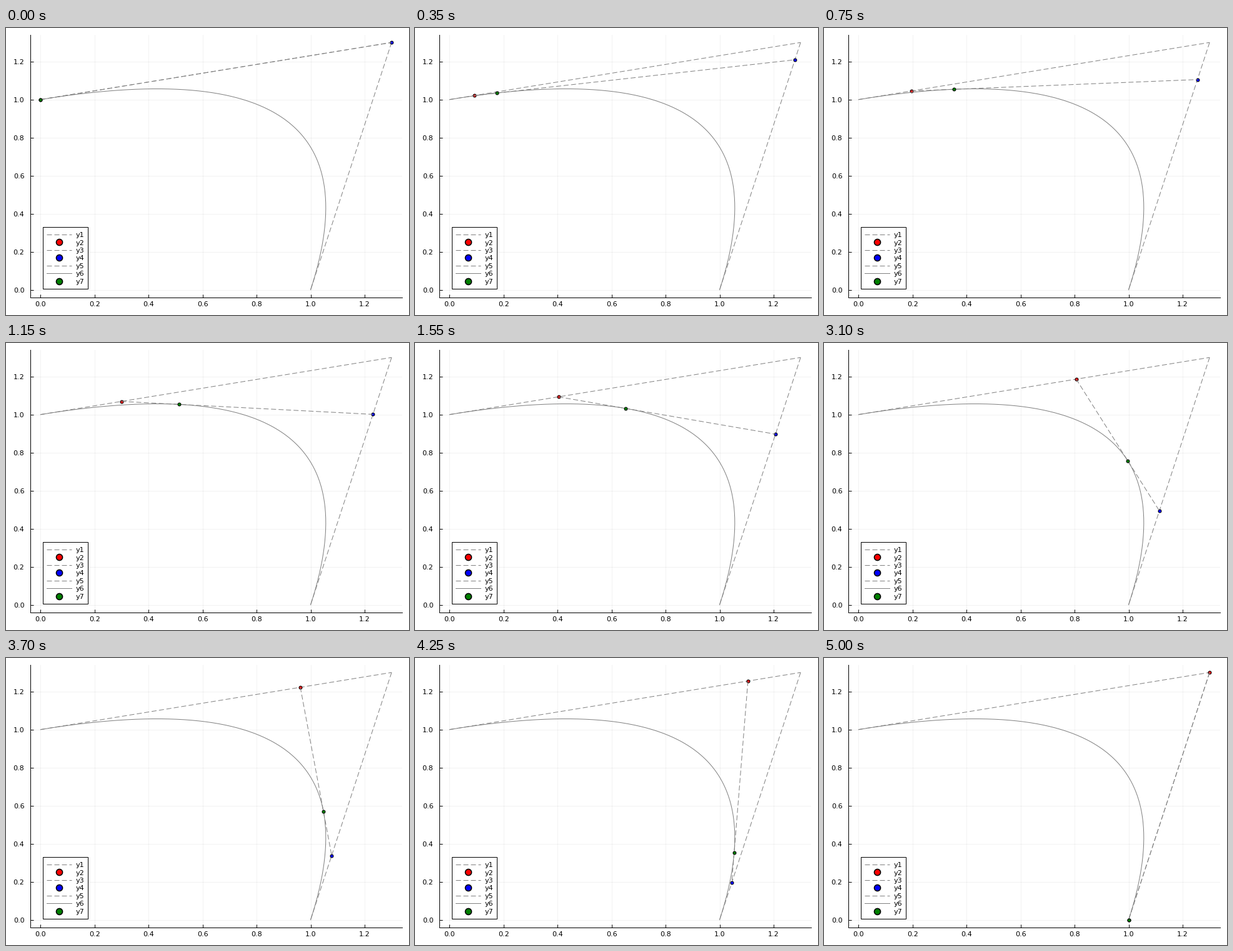
Recreate the animation shown at these times as a matplotlib script. Size 645 px wide and 460 px high, loop 5.05 s.

```python
import numpy as np
import matplotlib.pyplot as plt
from matplotlib.animation import FuncAnimation
from matplotlib.patches import Rectangle

W, H, DPI = 645, 460, 80
PX = 72 / DPI  # one pixel in points
STEPS = 100
LEFT, RIGHT, TOP, BOTTOM = 38.5, 634, 11.3, 431.5

plt.rcParams.update({"font.family": "DejaVu Sans", "font.size": 10})

A, B, C = np.array([[0, 1], [1.3, 1.3], [1, 0]])
SOLID = dict(color="gray", lw=PX)
DASHED = dict(SOLID, ls=(0, (8, 4)), dash_capstyle="butt")


def lerp(p, q, t):
    return p + (q - p) * t


def bezier(t):
    return lerp(lerp(A, B, t), lerp(B, C, t), t)


def dot(ax, x, y, color, size, edge):
    return ax.plot([x], [y], "o", ms=size * PX, mfc=color, mec="black",
                   mew=edge * PX, clip_on=False)[0]


def segment(ax, p, q, z):
    return ax.plot([p[0], q[0]], [p[1], q[1]], zorder=z, **DASHED)[0]


fig = plt.figure(figsize=(W / DPI, H / DPI), dpi=DPI, facecolor="white")

# Plot area
ax = fig.add_axes([LEFT / W, 1 - BOTTOM / H, (RIGHT - LEFT) / W, (BOTTOM - TOP) / H])
ax.set(xlim=(-0.039, 1.339), ylim=(-0.039, 1.339))
ticks = np.arange(7) * 0.2
labels = [f"{v:.1f}" for v in ticks]
ax.set_xticks(ticks, labels)
ax.set_yticks(ticks, labels)
ax.tick_params(direction="in", length=5 * PX, width=PX)
ax.tick_params(axis="x", pad=6.5 * PX)
ax.tick_params(axis="y", pad=9 * PX)
ax.grid(color="black", alpha=0.1, lw=0.5 * PX)
ax.set_axisbelow(True)
ax.spines[["top", "right"]].set_visible(False)
ax.spines[["left", "bottom"]].set_linewidth(PX)

# Construction lines, curve and moving points
segment(ax, A, B, 3)
red = dot(ax, *A, "red", 5, 1)
red.set_zorder(4)
segment(ax, B, C, 5)
blue = dot(ax, *B, "blue", 5, 1)
blue.set_zorder(6)
tangent = segment(ax, A, B, 7)
curve = np.array([bezier(t) for t in np.linspace(0, 1, 201)])
ax.plot(*curve.T, zorder=8, **SOLID)
green = dot(ax, *A, "green", 5, 1)
green.set_zorder(9)

# Legend, laid out in pixels
key = fig.add_axes([0, 0, 1, 1])
key.set(xlim=(-0.5, W - 0.5), ylim=(H - 0.5, -0.5))
key.axis("off")
key.add_patch(Rectangle((58, 318), 72.5, 99.5, fc="white", ec="black", lw=PX))
styles = [DASHED, "red", DASHED, "blue", DASHED, SOLID, "green"]
for i, style in enumerate(styles):
    y = 330.5 + 12.43 * i
    if isinstance(style, str):
        dot(key, 84.5, y, style, 10, 1.6)
    else:
        key.plot([64.5, 104.5], [y, y], **style)
    key.text(110.7, y + 4.2, f"y{i + 1}", va="baseline")


def update(frame):
    t = frame / STEPS
    p, q = lerp(A, B, t), lerp(B, C, t)
    for point, (x, y) in ((red, p), (blue, q), (green, bezier(t))):
        point.set_data([x], [y])
    tangent.set_data([p[0], q[0]], [p[1], q[1]])
    return red, blue, tangent, green


anim = FuncAnimation(fig, update, frames=STEPS + 1, interval=50,
                     repeat=True, repeat_delay=0)
plt.show()
```
